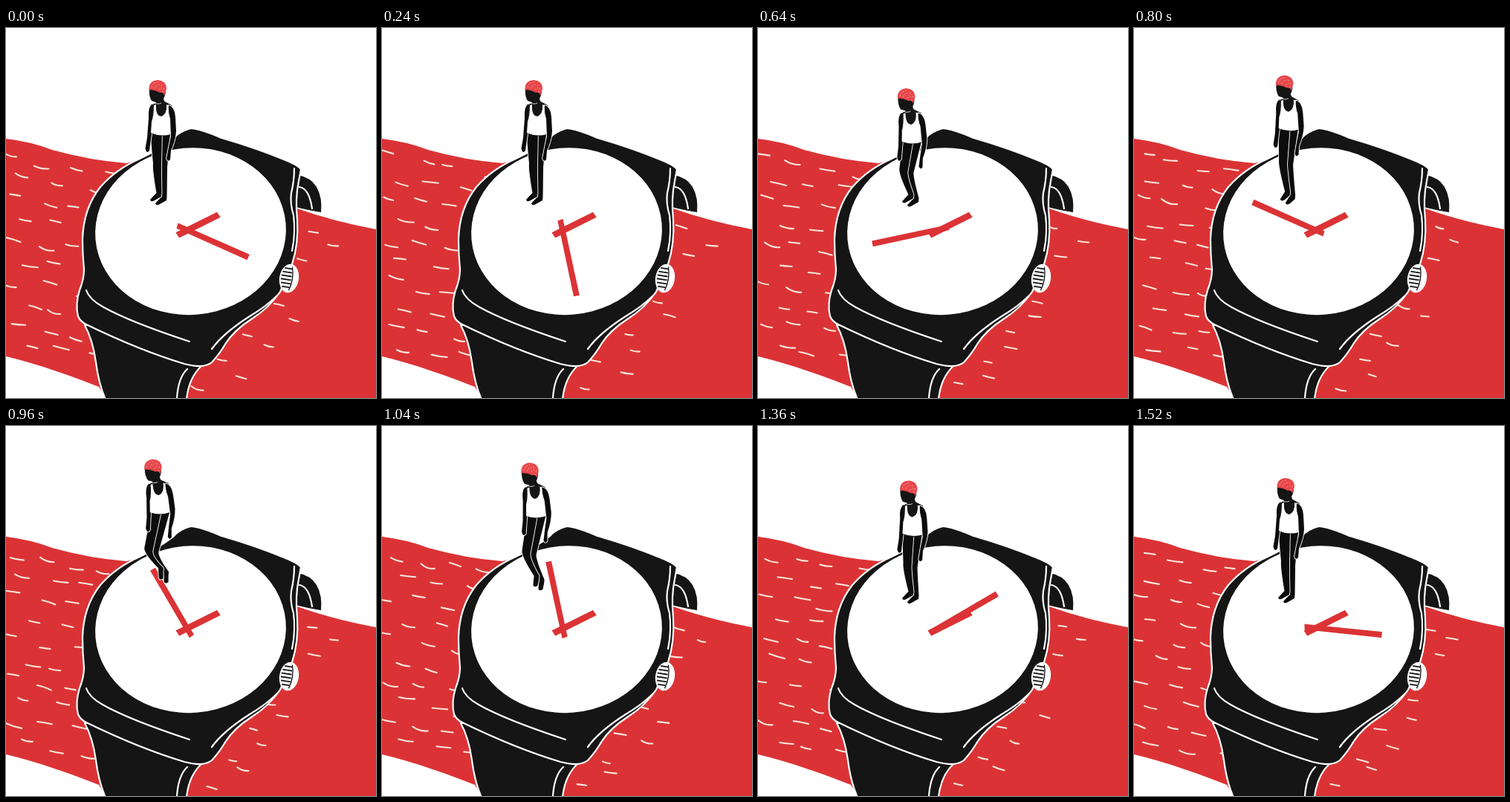
An HTML page that plays this animation: 498x498 px, repeating every 1600 ms.

```html
<!DOCTYPE html>
<html lang="en">
<head>
<meta charset="utf-8">
<title>Jumping the minute hand</title>
<style>
  html, body { margin: 0; width: 100%; height: 100%; overflow: hidden; background: #fff; }
  svg { display: block; width: 100vw; height: 100vh; }
  .ink { fill: #151515; }
  .red { fill: #db3335; }
  .edge { stroke: #fff; stroke-width: 2.2; stroke-linejoin: round; }
  .line { fill: none; stroke: #fff; stroke-width: 2.2; stroke-linecap: round; }
  .skin { fill: #0c0c0c; stroke: #fff; stroke-width: 1.8; paint-order: stroke; stroke-linejoin: round; }
  .hair { fill: #e8474a; }
  #dashes { fill: none; stroke: #f6e6dd; stroke-width: 2.1; stroke-linecap: round; }
</style>
</head>
<body>
<svg viewBox="0 0 498 498">
  <!-- wrist -->
  <path class="red" d="M0 149Q34 153 62 164Q112 178 162 182L250 160 392 243Q440 260 498 271V498H134L125 483C90 469 45 453 0 442Z"/>
  <path id="dashes"/>

  <!-- strap and buckle loop -->
  <path class="ink edge" d="M106 400Q117 420 121 450Q125 480 134 500H243Q246 470 264 454L200 400Z"/>
  <path class="line" d="M230 498Q232 470 244 459"/>
  <path class="ink" d="M393 198Q410 201 418 214Q426 228 424 248Q410 246 390 241Z"/>
  <path class="line" d="M395 214Q408 216 412 243"/>

  <!-- case -->
  <path class="ink edge" d="M249 135Q233 139 225 149Q206 164 180 176Q148 190 127 214Q104 243 103 285Q103 305 105 325Q105 338 99 353Q93 372 97 388Q100 395 108 399Q180 434 240 452Q266 459 277 450Q288 438 296 424Q307 407 330 392Q354 377 369 355L385 318Q394 290 392 258Q389 230 394 206L397 190Q392 184 374 177Q335 161 290 148Q262 136 249 135Z"/>
  <path class="line" d="M388 189Q388 205 384 222Q382 236 387 252Q390 275 385 300"/>
  <path class="line" d="M108 353Q112 365 130 375Q165 395 247 422"/>
  <path class="line" d="M277 432Q292 411 328 388Q350 375 365 360"/>
  <ellipse cx="248.5" cy="273.7" rx="128.5" ry="112.3" fill="#fff" transform="rotate(-5 248.5 273.7)"/>

  <!-- crown -->
  <g transform="rotate(9 381 337)" fill="none" stroke="#151515">
    <ellipse cx="381" cy="337" rx="13" ry="19.500" fill="#fff" stroke="none"/>
    <path d="M373 324h10M371 329h13M370 334h14M370 339h14M371 344h13M373 349h10" stroke-width="1.800"/>
    <path d="M383 321Q388 337 383 353" stroke-width="1.300"/>
  </g>

  <!-- hands -->
  <path class="red" d="M-14 -4.500L48 -4 49 4.500 -13 4Z" transform="translate(243 273) rotate(-27)"/>
  <path class="red" id="minute" d="M-14 -3.500L-13 4 91 4 91 -4Z"/>

  <!-- figure -->
  <path class="skin" id="backLeg"/>
  <path class="skin" id="frontLeg"/>
  <g id="body">
    <path class="skin" d="M197 102Q191 106 192 121L190 148 187.500 162Q189 170 193 165L195 150 199 122Z"/>
    <path class="ink" d="M196 104Q204 98 212 98L223 104 226 113 221 122 222 144Q208 148 195 141L196 118Z"/>
    <path fill="#fff" d="M199 104Q199 118 196 126L195 141Q208 147 222 143L221 123Q217 115 220 105L216 103Q217 116 209 119Q201 118 202 103Z"/>
    <path class="skin" d="M219 104Q227 106 228 120L229 139Q228 152 222 165L221 177Q218 181 216 176L219 160 222 146 221 122Q218 112 219 104Z"/>
    <path class="ink" d="M193 81Q192 92 196 98L202 100 202 104Q209 107 214 101L212 95Q217 87 213 79Z"/>
    <path d="M196 99Q204 104 209 101" fill="none" stroke="#fff" stroke-width=".8"/>
    <path class="hair" d="M192.500 83Q192 71 204 70Q216 71 216 82L213 91Q212 86 207 87Q200 83 192.500 83Z"/>
    <path d="M196 80Q198 73 205 73M200 81Q203 75 211 77M206 83Q208 79 214 82M210 86L213 86" fill="none" stroke="#f6aaa6" stroke-dasharray="1.500 2"/>
  </g>
</svg>
<script>
const STEP = 80, STEPS = 20;
const set = (id, name, value) => document.getElementById(id).setAttribute(name, value);
const rnd = n => { const v = Math.sin(n * 12.9898) * 43758.5453; return v - Math.floor(v); };
const bump = (k, mid, w) => Math.abs(k - mid) < w ? (1 + Math.cos(Math.PI * (k - mid) / w)) / 2 : 0;

// Tapered leg, bent at the knee and ending in a pointed foot
function leg(hx, hy, kx, ky, ax, ay, droop) {
  const tx = ax - 12 + 9 * droop, ty = ay + 9 + 4 * droop;
  return `M${hx - 7} ${hy}Q${hx - 7} ${hy + 12} ${kx - 6} ${ky - 5}Q${kx - 7} ${ky + 3} ${ax - 3.5} ${ay}` +
    `L${tx} ${ty}Q${tx + 1} ${ty + 4} ${tx + 6} ${ty + 1}L${ax + 3} ${ay + 5}L${ax + 3.5} ${ay}` +
    `Q${kx + 5} ${ky + 8} ${kx + 5} ${ky}L${hx + 8} ${hy + 1}Z`;
}

// Crouch, jump over the passing hand, land
function figure(k) {
  const crouch = 12 * bump(k, 7.5, 2.6) + 17 * bump(k, 15.6, 2);
  const rise = 26 * Math.max(0, 1 - ((k - 12) / 2.3) ** 2);
  const bx = -.12 * crouch - .04 * rise, by = crouch - rise;
  const kx = -.7 * crouch - .45 * rise, ky = .65 * crouch - .7 * rise;
  const fx = .1 * rise, fy = .2 * crouch - rise * rise / 22;
  const droop = rise / 26, lean = -.28 * crouch - .19 * rise;
  set("body", "transform", `translate(${bx} ${by}) rotate(${lean} 209 143)`);
  set("frontLeg", "d", leg(202 + bx, 140 + by, 204 + kx, 187 + ky, 206 + fx, 222 + fy, droop));
  set("backLeg", "d", leg(213 + bx, 142 + by, 212 + kx, 188 + ky, 213 + fx, 227 + fy, droop));
}

// Hair strokes on the arm, scattered anew each step
function dashes(k) {
  let d = "", seed = 7 + k * 401;
  const jitter = a => (rnd(seed++) - .5) * a;
  const dash = (x, y, size) => {
    const w = size + jitter(size / 2), h = w * (.22 + jitter(.28));
    d += `M${x - w / 2} ${y - h / 2}q${w * .45} ${h * (.7 + jitter(1))} ${w} ${h}`;
  };
  for (let r = 0; r < 10; r++)
    for (let c = 0; c < 4; c++) {
      const x = 12 + c * 42 + (r % 2) * 19 + jitter(20);
      dash(x, 172 + r * 28 + x * .17 + jitter(15), 17);
    }
  for (let r = 0; r < 3; r++)
    dash(406 + (r % 2) * 28 + jitter(20), 271 + r * 19 + jitter(8), 13);
  for (let r = 0; r < 7; r++) {
    const y = 375 + r * 18 + jitter(12);
    dash(372 - (y - 360) * .83 + (r % 2) * 35 + jitter(24), y, 13);
  }
  set("dashes", "d", d);
}

const start = performance.now();
let last = -1;
function draw() {
  const k = Math.floor((performance.now() - start) / STEP) % STEPS;
  if (k !== last) {
    last = k;
    set("minute", "transform", `translate(243 271.5) rotate(${24 + k * 360 / STEPS})`);
    figure(k);
    dashes(k);
  }
  requestAnimationFrame(draw);
}
draw();
</script>
</body>
</html>
```
